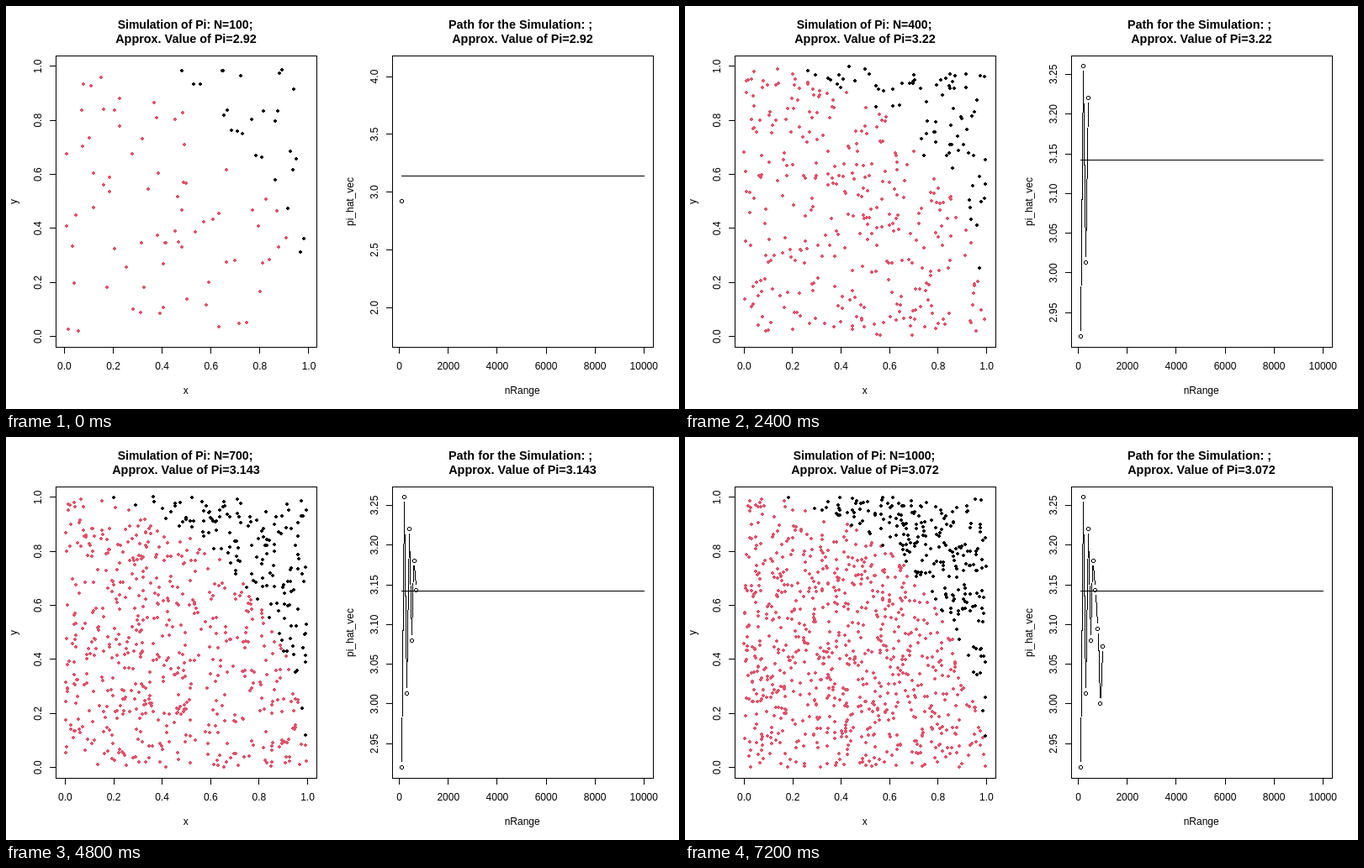
An HTML page for the animation above (8000 ms loop, 800 by 480 pixels).

```html
<!DOCTYPE html>
<html lang="en">
<head>
<meta charset="utf-8">
<title>Simulation of Pi</title>
<style>
  html, body { margin: 0; width: 100%; height: 100%; overflow: hidden; background: #fff; }
  svg { display: block; width: 800px; height: 480px; }
  text { font: 12px Arial, "Liberation Sans", sans-serif; text-anchor: middle; fill: #000; }
  .title { font-weight: bold; font-size: 14.4px; }
  .count { font-size: 14px; }
  .line { fill: none; stroke: #000; stroke-width: 1; shape-rendering: crispEdges; }
  .dots { shape-rendering: crispEdges; }
</style>
</head>
<body>
<svg id="stage" viewBox="0 0 800 480"></svg>
<script>
const STEP = 800;
const LEFT = 70.55, RIGHT = 358.25, TOP = 71.91, BOTTOM = 393.69;
const RED = '#DF536B';
const GAP = 6;
const stage = document.getElementById('stage');

// points inside the quarter circle after 100, 200, ... 1000 draws
const hits = [73, 163, 226, 322, 385, 477, 550, 619, 675, 768];
const size = i => (i + 1) * 100;
const estimates = hits.map((h, i) => 4 * h / size(i));

function seeded(seed) {
  return () => {
    seed = (seed + 0x6D2B79F5) | 0;
    let t = Math.imul(seed ^ (seed >>> 15), 1 | seed);
    t = (t + Math.imul(t ^ (t >>> 7), 61 | t)) ^ t;
    return ((t ^ (t >>> 14)) >>> 0) / 4294967296;
  };
}

const scale = (a, b, p, q) => v => p + (v - a) / (b - a) * (q - p);
const px = v => Math.floor(v) + .5;
const path = d => `<path class="line" d="${d}"/>`;
const label = (x, y, s, cls = '') => `<text class="${cls}" x="${x}" y="${y}">${s}</text>`;
const upright = (x, y, s) => `<text transform="translate(${x} ${y}) rotate(-90)">${s}</text>`;

function dots(points, color) {
  const d = points.map(([x, y]) =>
    `M${Math.floor(x) - 1} ${Math.floor(y) - 2}h2v1h1v2h-1v1h-2v-1h-1v-2h1z`).join('');
  return `<path class="dots" fill="${color}" d="${d}"/>`;
}

// uniform draws, kept until both groups have their exact count
function sample(i, lo, hi, sx, sy) {
  const rand = seeded(977 * i + 31);
  const inside = [], outside = [];
  while (inside.length + outside.length < size(i)) {
    const x = lo + rand() * (hi - lo), y = rand();
    const isIn = x * x + y * y <= 1;
    const group = isIn ? inside : outside;
    const room = isIn ? hits[i] : size(i) - hits[i];
    if (group.length < room) group.push([sx(x), sy(y)]);
  }
  return dots(inside, RED) + dots(outside, '#000');
}

function axes(dx, sx, sy, xTicks, yTicks, xName, yName, xDigits, yDigits) {
  let d = `M${dx + 59.5} 59.5h310v347h-310z`, s = '';
  for (const v of xTicks) {
    d += `M${px(sx(v))} 406v8`;
    s += label(sx(v), 433, v.toFixed(xDigits));
  }
  for (const v of yTicks) {
    d += `M${dx + 52} ${px(sy(v))}h8`;
    s += upright(dx + 42, sy(v), v.toFixed(yDigits));
  }
  return path(d) + s + label(dx + 213.7, 461.5, xName) + upright(dx + 13, 233, yName);
}

function trace(i, sx, sy) {
  const pts = estimates.slice(0, i + 1).map((v, k) => [sx(size(k)), sy(v)]);
  let d = `M470 ${px(sy(Math.PI))}H759`, rings = '';
  pts.forEach(([x, y], k) => {
    rings += `<circle class="line" cx="${px(x)}" cy="${px(y)}" r="2"/>`;
    if (!k) return;
    const [a, b] = pts[k - 1], len = Math.hypot(x - a, y - b);
    const gx = (x - a) / len * GAP, gy = (y - b) / len * GAP;
    d += `M${px(a + gx)} ${px(b + gy)}L${px(x - gx)} ${px(y - gy)}`;
  });
  return path(d) + rings;
}

function ticks(from, to, by) {
  const n = Math.round((to - from) / by);
  return Array.from({ length: n + 1 }, (_, k) => from + k * by);
}

function scene(i) {
  // the sample's extremes close in on 0 and 1 as it grows
  const lo = .4 / size(i), hi = 1 - .6 / size(i);
  const sx = scale(lo, hi, LEFT, RIGHT), sy = scale(0, 1, BOTTOM, TOP);

  // a single estimate gets a range of 40% either way
  const [min, max] = i ? [estimates[0], estimates[1]] : [.6 * estimates[0], 1.4 * estimates[0]];
  const nx = scale(100, 10000, LEFT + 400, RIGHT + 400);
  const ny = scale(min, max, BOTTOM, TOP);

  const unit = ticks(0, 1, .2);
  const yTicks = i ? ticks(2.95, 3.25, .05) : ticks(2, 4, .5);
  const value = 'Approx. Value of Pi=' + Number(estimates[i].toFixed(3));
  return label(213, 27, `Simulation of Pi: N=${size(i)};`, 'title count')
    + label(214, 44, value, 'title')
    + label(611.5, 27, 'Path for the Simulation: ;', 'title')
    + label(614, 44, value, 'title')
    + axes(0, sx, sy, unit, unit, 'x', 'y', 1, 1)
    + sample(i, lo, hi, sx, sy)
    + axes(400, nx, ny, ticks(0, 10000, 2000), yTicks, 'nRange', 'pi_hat_vec', 0, i ? 2 : 1)
    + trace(i, nx, ny);
}

const scenes = hits.map((_, i) => scene(i));
let shown = -1;

function render(time) {
  const i = Math.floor(time / STEP) % scenes.length;
  if (i === shown) return;
  shown = i;
  stage.innerHTML = scenes[i];
}

let start = null;
function tick(now) {
  if (start === null) start = now;
  render(now - start);
  requestAnimationFrame(tick);
}
render(0);
requestAnimationFrame(tick);
</script>
</body>
</html>
```
